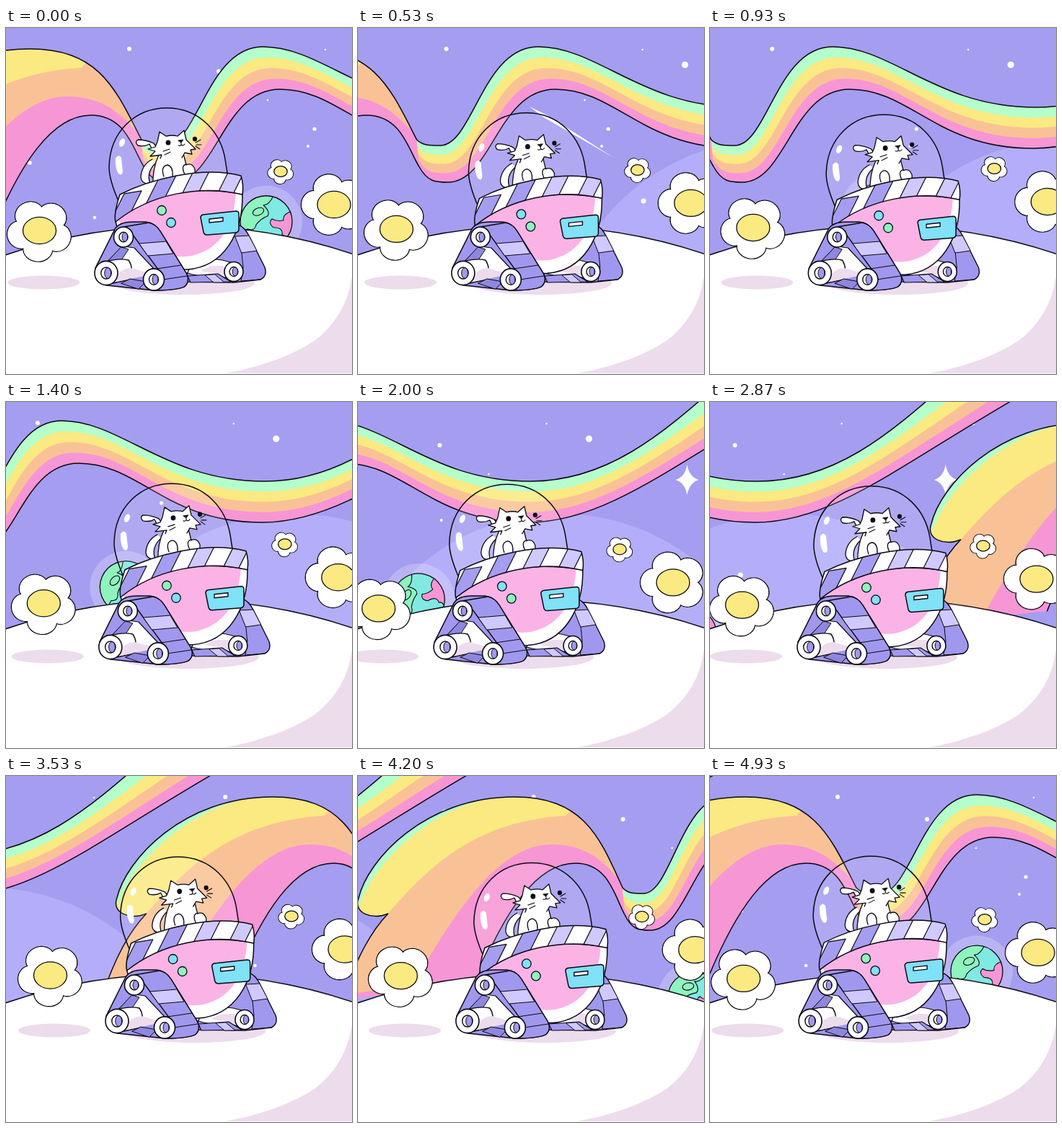
Animation, 480 px wide and 480 px high, one loop 4990 ms. Source, as an HTML page with a canvas:

```html
<!DOCTYPE html>
<html lang="en">
<head>
<meta charset="utf-8">
<title>Space rover</title>
<style>
html, body { margin: 0; width: 100%; height: 100%; overflow: hidden; background: #a59df0; }
canvas { display: block; width: 100%; height: 100%; }
</style>
</head>
<body>
<canvas width="480" height="480"></canvas>
<script>
const g = document.querySelector('canvas').getContext('2d');
const LOOP = 4990, FRAMES = 75, CYCLE = 25;
const C = {
  sky: '#a59df0', hill: '#b4aefa', ink: '#0b0812', white: '#fff', shade: '#ecdcec',
  green: '#b4ffca', yellow: '#fbe982', orange: '#f9c296', pink: '#f796d4',
  body: '#fbb3e5', cyan: '#80e1f7', mint: '#8ff3bd', sea: '#7fe9e2',
  dark: '#8f87df', belt: '#a098ee', light: '#cfc9ff'
};

const mod = (a, n) => ((a % n) + n) % n;
const clamp = u => Math.max(0, Math.min(1, u));
const wave = u => (1 - Math.cos(u * Math.PI)) / 2;

// Camera sway: eased between its turning points
const turns = [[0, 0], [1080, 14], [2020, -18], [3800, 17], [LOOP, 0]];
function sway(t) {
  const i = turns.findIndex(k => k[0] > t), [a, x] = turns[i - 1], [b, y] = turns[i];
  return x + (y - x) * wave((t - a) / (b - a));
}

function paint(path, fill, line = 1.4) {
  if (fill) { g.fillStyle = fill; g.fill(path); }
  if (line) { g.lineWidth = line; g.strokeStyle = C.ink; g.stroke(path); }
}
const shape = (d, fill, line) => paint(new Path2D(d), fill, line);
function oval(x, y, rx, ry, fill, line = 0, turn = 0) {
  const p = new Path2D();
  p.ellipse(x, y, rx, ry, turn, 0, 7);
  paint(p, fill, line);
}
function at(x, y, draw) {
  g.save();
  g.translate(x, y);
  draw();
  g.restore();
}
function within(path, draw) {
  g.save();
  g.clip(path);
  draw();
  g.restore();
}

// Curves are chains of cubic Bezier points, reversible as lists
const points = text => text.split(' ').map(p => p.split(',').map(Number));
const lead = points('-205,310 -185,250 -165,215 -142,191');
const topNear = points('-142,191 -165,200 -190,190 -183,170 -170,115 -90,29 33,29 130,29 152,85 188,155');
const topFar = points('188,155 196,163 205,163 221,163 265,163 280,26 356,26 440,26 500,110 638,110 745,110 820,45 900,-25');
const lowNear = points('-22,290 20,185 65,121 118,121 165,121 175,165 191,192');
const lowFar = points('191,192 203,214 215,214 231,214 292,214 300,85 380,85 465,85 500,167 635,167 750,167 850,75 1040,-30');
const nearBands = [
  [C.orange, points('-107,290 -45,180 15,95 85,95 130,95 155,115 178,140'), points('200,0 -250,0 -250,310')],
  [C.yellow, points('-142,191 -85,125 -20,62 105,55'), points('150,0 -250,0 -250,197 -150,197')],
  [C.green, points('-181,180 -165,125 -85,42 12,29'), points('-100,0 -250,0')]
];
const farBands = [C.orange, C.yellow, C.green].map((fill, i) => [fill,
  topFar.map(([x, y], k) => [0, 1].map(j => topFar[k][j] + (lowFar[k][j] - topFar[k][j]) * (3 - i) / 4))]);

function curve(path, pts) {
  path.lineTo(...pts[0]);
  for (let i = 1; i < pts.length; i += 3) path.bezierCurveTo(...pts[i], ...pts[i + 1], ...pts[i + 2]);
}

function ribbon(sec) {
  // the near arch comes in faster than the far part
  const extra = sec < 0 ? 30 : 0;
  const move = pts => pts.map(([x, y]) => [x - (200 + extra * clamp((350 - x) / 200)) * sec, y]);
  const outline = (...lists) => {
    const p = new Path2D();
    lists.forEach(l => curve(p, move(l)));
    return p;
  };
  const back = l => [...l].reverse();
  const whole = outline(lead, topNear, topFar, back(lowFar), back(lowNear));
  paint(whole, C.pink, 0);
  within(whole, () => {
    for (const [fill, edge, rest] of nearBands) {
      const p = outline(edge);
      move(rest).forEach(q => p.lineTo(...q));
      paint(p, fill, 0);
    }
    for (const [fill, edge] of farBands) paint(outline(topFar, back(edge)), fill, 0);
  });
  paint(outline(lead, topNear, topFar), null, 1.5);
  paint(outline(lowNear, lowFar), null, 1.5);
}

const farStars = points('171,29,3 443,30,1.2 295,60,3 363,100,1.3 502,51,4.6');
const nearStars = points('428,140,2.6 419,164,2 33,187,2.8 123,263,2.3 477,240,3.5');

function stars(sec) {
  const layer = (list, speed) => {
    const span = speed * LOOP / 1000;
    for (const [x, y, r] of list)
      for (const k of [0, span]) oval(mod(x - speed * sec + 20, span) - 20 + k, y, r, r, C.white);
  };
  layer(farStars, 91);
  layer(nearStars, 152);
  at(mod(796 - 150 * sec, 750) - 40, 108, () =>
    shape('M0-21Q3-4 16 0Q3 4 0 21Q-3 4-16 0Q-3-4 0-21Z', C.white, 0));
}

function meteor(sec) {
  const a = clamp((sec - .53) / .2), b = clamp((sec - .32) / .2), m = a + (b - a) * .2;
  if (b <= a) return;
  const spot = (u, off = 0) => `${236 + 119 * u + off} ${108 + 72 * u - off}`;
  shape(`M${spot(a)}L${spot(m, 1.8)}L${spot(b)}L${spot(m, -1.8)}Z`, C.white, 0);
}

function planet(sec) {
  const turn = .2507 - .27 * (sec > 3 ? sec - LOOP / 1000 : sec);
  at(232 + 520 * Math.sin(turn), 772.5 - 520 * Math.cos(turn), () => {
    oval(0, 0, 50, 50, 'rgba(255,255,255,.22)');
    g.rotate(turn - .25);
    const disc = new Path2D();
    disc.arc(0, 0, 36, 0, 7);
    paint(disc, C.sea, 0);
    within(disc, () => {
      shape('M-40-40H12Q4-22-4-23Q6-14 2-8Q-8-4-14 4Q-16 14-26 10L-40 22Z', C.mint, 1.1);
      shape('M40-16Q22-12 24-2Q14 0 8-4Q2 2 10 8Q24 8 22 18Q30 20 22 40H44Z', C.pink, 1.1);
      shape('M-40 18Q-20 10-18 24Q-8 22-6 40H-40Z', C.pink, 1.1);
      oval(-11, -14, 8, 5, C.mint, 1.1, -.4);
    });
    paint(disc, null, 1.3);
  });
}

function flower(x, y, s, turn) {
  at(x, y, () => {
    g.scale(s, s * .95);
    const petals = (grow, line) => {
      for (let i = 0; i < 5; i++) {
        const a = turn + i * Math.PI * .4;
        oval(27 * Math.cos(a), 27 * Math.sin(a), 18.5 + grow, 20.5 + grow, C.white, line, a);
      }
    };
    petals(0, 1.4 / s);
    petals(-.7, 0);
    oval(0, 0, 23, 19.5, C.yellow, 1.3 / s);
  });
}

function wheel(x, y, r) {
  oval(x, y, r, r * 1.04, C.white, 1.6);
  oval(x, y, r * .45, r * .5, C.white, 1.4);
  oval(x + r * .14, y, r * .28, r * .46, C.belt, 1);
}

function rearTrack() {
  shape('M300 272L322 273Q331 276 337 288L359 332Q363 344 353 349L316 353L252 352Q246 346 256 334Z', C.belt);
  shape('M318 289L337 288L348 309L327 312Z', C.light, 1);
  shape('M327 312L329 332L326 351L353 349', null, 1);
  shape('M256 327Q272 318 300 322L316 326V351L295 343Q270 346 252 340Z', C.white, 1.2);
  shape('M270 337Q282 328 302 330L306 344L290 341Z', C.shade, 0);
  shape('M252 344L294 341L312 352L256 353Z', C.belt, 1.2);
  shape('M276 343L288 353H303L290 342Z', C.light, 1);
  wheel(316, 338, 13);
}

function frontTrack() {
  shape('M150 281Q155 269 176 269L194 269Q206 270 214 282L250 340Q256 352 247 359Q235 364 205 364L140 357Q122 350 124 333Z', C.belt, 1.6);
  shape('M163 303L178 305L206 335L194 343L150 346L140 325Z', C.white, 1.2);
  shape('M160 304L170 307L160 322L140 325Z', C.dark, 1);
  shape('M139 324Q158 319 170 322Q178 334 171 349L139 356Z', C.white, 1.4);
  shape('M152 347Q158 334 173 333L198 340L192 344L154 352Z', C.shade, 0);
  shape('M160 354L172 348L194 352L184 362Z', C.dark, 1);
  shape('M163 276L198 270Q208 272 214 282L250 340Q256 352 247 359Q235 364 205 364Q222 358 217 343L176 287Z', C.belt, 1.3);
  shape('M185 299L222 296L232 313L197 316Z', C.light, 1);
  shape('M209 334L243 329M218 349L251 344', null, 1);
  wheel(163, 290, 13.5);
  wheel(139, 340, 16);
  wheel(205, 349, 14.5);
}

function cat() {
  shape('M203 182Q188 190 187 207Q188 217 200 216Q194 200 208 187', C.white, 1.3);
  shape('M203 169L199 161Q192 165 183 163Q178 158 183 155Q194 155 205 160L211 168Z', C.white, 1.3);
  shape('M212 176Q203 195 204 218H252Q264 206 262 196Q258 186 250 190L246 174Z', C.white, 1.3);
  shape('M210 158L213 144L222 150Q231 148 238 150L247 142L250 155L263 168L256 169L258 175L248 173' +
    'L244 180L236 177L214 181L216 176L200 178L207 171L197 168L207 165Z', C.white, 0);
  shape('M214 181L216 176L200 178L207 171L197 168L207 165L210 158L213 144L222 150Q231 148 238 150' +
    'L247 142L250 155L263 168L256 169L258 175L248 173L244 180', null, 1.3);
  shape('M219 206Q214 192 224 190Q232 192 231 205M248 203Q242 191 250 189', null, 1.3);
  oval(225, 159, 3.4, 3.6, C.ink);
  oval(262, 154, 3.1, 3.3, C.ink);
  shape('M239 156L246 155L243 159Z', C.ink, .8);
  shape('M243 159V162M239 163Q242 164 243 162Q246 164 248 161M218 171L227 168M220 176L228 172' +
    'M263 159L270 155M264 162H271M263 164L269 168', null, 1.1);
}

const domePath = new Path2D('M156 240Q143 210 143 193C144 143 180 111 223 111C270 111 298 146 304 182L309 214Z');

function glass() {
  paint(domePath, null, 1.5);
  oval(161, 159, 3.6, 6, C.white, 0, .4);
  shape('M152 181Q156 174 160 180L162 199Q161 206 156 202Q151 194 152 181Z', C.white, 0);
}

function hull(swap) {
  const bowl = new Path2D('M152 268C158 300 196 337 252 335C302 331 329 285 328 230Q210 212 152 268Z');
  paint(bowl, C.white, 0);
  within(bowl, () =>
    shape('M150 258L168 284C190 306 226 322 258 316C300 306 317 270 319 226L150 215Z', C.body, 0));
  paint(bowl, null, 1.5);

  const rim = new Path2D('M152 269Q149 258 158 231C195 212 270 190 326 205Q330 218 328 231C270 217 200 230 152 269Z');
  paint(rim, C.white, 0);
  within(rim, () => {
    for (let i = 0; i < 4; i++) {
      const x = 152 + 48 * i, y = 218 + .0025 * (x - 265) ** 2;
      shape(`M${x - 8} ${y + 20}L${x + 12} ${y - 20}L${x + 36} ${y - 24}L${x + 16} ${y + 16}Z`,
        i < 2 ? C.sky : C.light, 1.2);
    }
  });
  paint(rim, null, 1.5);

  oval(216, 253, 6.3, 6.5, swap ? C.cyan : C.mint, 1.3);
  oval(229, 270, 6.3, 6.5, swap ? C.mint : C.cyan, 1.3);
  shape('M273 259L319 254Q323 254 323 258V280Q322 284 318 284L279 287Q275 287 274 283L270 263Q270 260 273 259Z', C.cyan, 1.5);
  shape('M282 265L301 263V268L282 270Z', C.white, 1.4);
}

function rover(frame) {
  const hop = wave(frame % CYCLE / CYCLE * 2);
  const swap = Math.floor((frame + 9.5) / (CYCLE / 2)) % 2 === 1;
  oval(247, 354, 98, 16, C.shade);
  rearTrack();
  at(5 * hop, 9.5 * hop, () => paint(domePath, 'rgba(255,255,255,.12)', 0));
  at(5 * hop, 8 * hop, cat);
  at(5 * hop, 9.5 * hop, glass);
  at(5 * hop, 7.5 * hop, () => hull(swap));
  frontTrack();
}

function draw(now) {
  const frame = Math.floor((now % LOOP + 2) * FRAMES / LOOP) % FRAMES;
  const t = frame * LOOP / FRAMES, sec = t / 1000, dx = sway(t), dy = -.3 * dx;
  g.lineJoin = g.lineCap = 'round';
  g.fillStyle = C.sky;
  g.fillRect(0, 0, 480, 480);

  oval(mod(1000 - 200 * sec, 998) - 320, 455, 300, 300, C.hill);
  stars(sec);
  meteor(sec);
  ribbon(sec);
  ribbon(sec - LOOP / 1000);
  planet(sec);

  oval(242, 1024.5, 750, 750, C.white, 1.5);
  shape('M480 345Q472 400 428 434Q380 465 305 479H480Z', C.shade, 0);
  at(dx, 0, () => {
    oval(52, 353, 50, 9.5, C.shade);
    flower(381, 199 + dy, .4, .4);
    flower(455, 245 + dy, 1, Math.PI);
    flower(46.5, 281 + dy, 1, .4);
    rover(frame);
  });
}

const begin = performance.now();
function tick() {
  draw(performance.now() - begin);
  requestAnimationFrame(tick);
}
tick();
</script>
</body>
</html>
```
